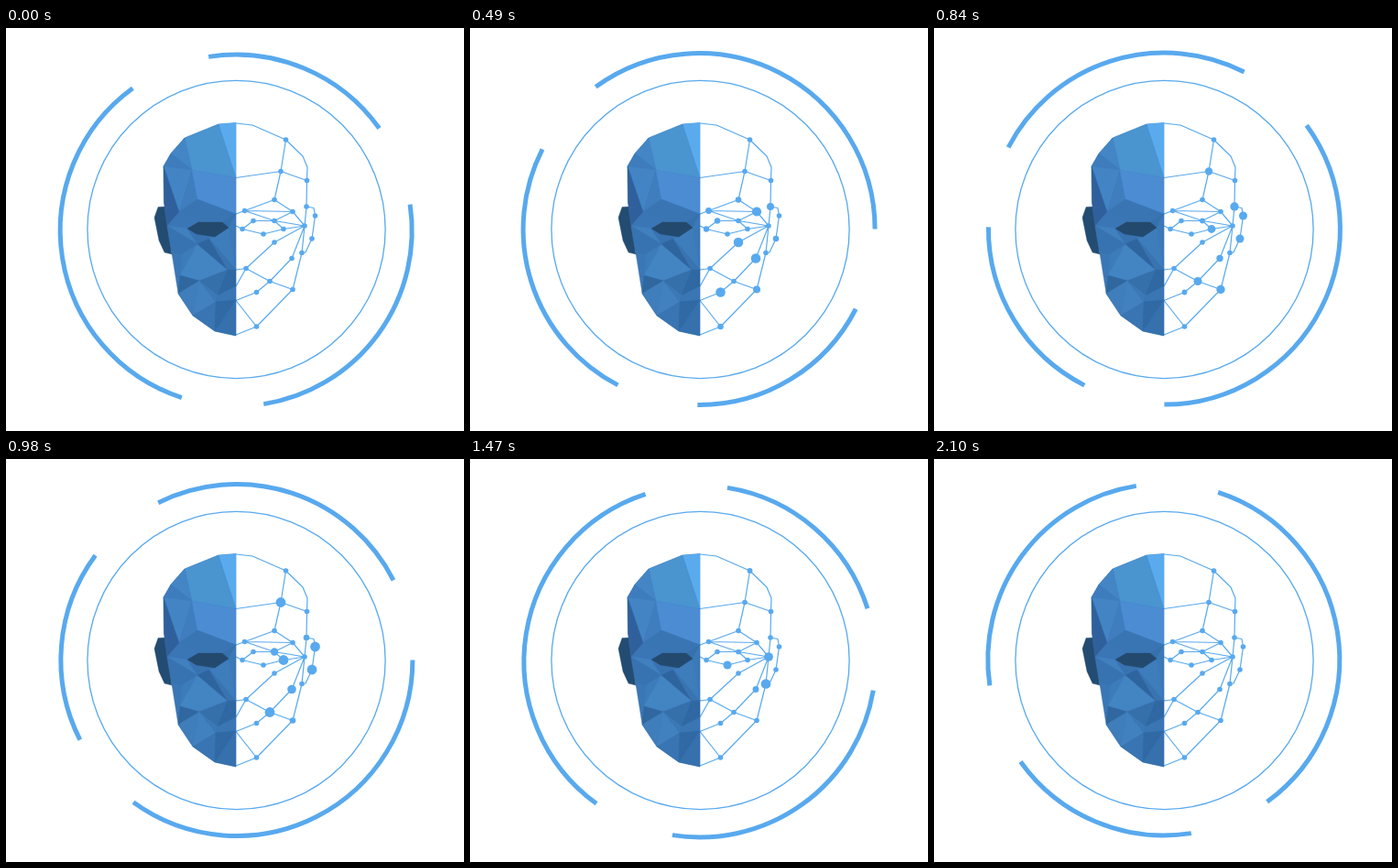
Recreate the animation shown at these times as an HTML page. Size 500 by 440 pixels, loop 2170 ms.

```html
<!DOCTYPE html>
<html lang="en">
<head>
<meta charset="utf-8">
<title>Face scan</title>
<style>
  html, body { margin: 0; width: 100%; height: 100%; overflow: hidden; background: #fff; }
  svg { display: block; width: 500px; height: 440px; }
  .line { fill: none; stroke: #58a9ee; }
</style>
</head>
<body>
<svg viewBox="0 0 500 440">
  <circle class="line" cx="251.5" cy="220" r="162.6" stroke-width="1.3"/>
  <g id="arcs">
    <circle class="line" cx="251.2" cy="221" r="192" stroke-width="5" pathLength="360"
      stroke-dasharray="63.5 27 89.5 27 126 27" transform="rotate(261 251.2 221)"/>
  </g>
  <path id="mesh" class="line" stroke-width="1.2" stroke-linejoin="round"/>
  <g id="face"></g>
  <g id="dots" fill="#58a9ee"></g>
</svg>
<script>
const STEP = 70, STEPS = 31, TURN = 18, REST = 2.8, SWELL = 2.6;
const $ = id => document.getElementById(id);

function add(parent, tag, attrs) {
  const el = document.createElementNS('http://www.w3.org/2000/svg', tag);
  for (const k in attrs) el.setAttribute(k, attrs[k]);
  parent.appendChild(el);
  return el;
}

// Corners of the shaded half
const corner = {
  A: [251, 103.5], B: [232, 105], C: [195, 120], D: [180, 137], E: [172, 151],
  F: [203, 155], G: [251, 163.5], H: [209, 187], I: [251, 203], J: [189, 201],
  K: [172.5, 190], L: [176, 216], M: [198, 219], N: [210, 212], O: [236, 212],
  P: [243, 218], Q: [228, 228], R: [208, 225], S: [181, 246], T: [209, 236],
  U: [222, 230], V: [190, 270], W: [251, 264], X: [188, 290], Y: [204, 314],
  Z: [228, 331], a: [251, 336], b: [211, 276], c: [231, 292], d: [251, 282],
  e: [251, 297], f: [242, 264], g: [229, 299], h: [192, 247],
  p: [175, 195], q: [166, 195.5], r: [162, 207], s: [167, 232], t: [173, 245], u: [181, 247]
};
const facets = {
  pqrstu: '#234c72', ABCDEKLSXYZa: '#3a77b5',
  ABG: '#5aabee', BCFG: '#4a94d0', CDF: '#4385c5', DEF: '#3e7cbd',
  EFJ: '#4384c4', FHJ: '#3f7dbe', EKLJ: '#30609c', FGIH: '#4b8cd2',
  HIONJ: '#3a75b3', JNML: '#3a76b5', IOP: '#3671ad', IPW: '#3b79b7',
  LMT: '#4180bf', LThS: '#3873b1', MRQUT: '#3873b0', PQUW: '#3d7dbc',
  ShV: '#3a77b6', hTV: '#3d7cba', TfbV: '#4384c3', TUf: '#2f659f',
  UfW: '#3974b1', VbX: '#30679f', XbY: '#3f7dbb', Ybg: '#4281bf',
  YgZ: '#3875b2', bfc: '#3670ab', bcg: '#3b78b5', fWdc: '#2f68a3',
  cdeg: '#3976b3', geZ: '#3069a4', eaZ: '#3671ad', MNOPQR: '#234a6e'
};
for (const keys in facets) {
  const points = [...keys].map(k => corner[k]).join(' ');
  const fill = facets[keys];
  add($('face'), 'polygon', { points, fill, stroke: fill, 'stroke-width': .4 });
}

// Each dot: x, y, then peak time and half width of its pulses
const dots = {
  a: [305.5, 122, 1770, 350], b: [300, 156.5, 1000, 330], c: [328.5, 166.5, 1790, 330],
  d: [293, 187.5, 290, 280], e: [260.5, 199.5, 300, 280], f: [313, 200.5, 550, 280],
  g: [328, 195, 700, 400], h: [337.5, 205, 970, 330], i: [293, 210.5, 1150, 350],
  j: [270, 210.5, 280, 280], k: [258, 219.5, 280, 280], l: [303, 219.5, 980, 330],
  m: [326, 216, 1590, 400], n: [281, 225, 1630, 400], o: [293, 234, 440, 370],
  p: [334, 230, 290, 280, 970, 320], q: [323, 245.5, 1440, 330],
  r: [312, 251.5, 550, 420, 1140, 500], s: [262, 262.5], t: [288, 276.5, 970, 330],
  u: [273.5, 288.5, 540, 340], v: [313, 285.5, 700, 400], w: [273.5, 326, 290, 280]
};
// Mesh joints without a dot
const joint = {
  A: [251, 104], B: [269, 106], C: [324, 140], D: [329, 152], E: [251, 163.5],
  F: [251, 203], G: [336, 196.5], H: [327, 245], I: [251, 216], J: [251, 264],
  K: [251, 282], L: [251, 297.5], M: [251, 335]
};
const chains = 'ABaCDcgmqvwM EbabcbdeFe dfm eif efm gGhpHq Ikjilnk lm im moJ mr sJ sK osts tv tr tuL Lw'
  .replace('moJ', 'mos').split(' ');
const place = k => (dots[k] || joint[k]).slice(0, 2);
$('mesh').setAttribute('d', chains.map(c => 'M' + [...c].map(place).join('L')).join(''));

const nodes = Object.values(dots).map(([cx, cy, ...pulses]) =>
  ({ el: add($('dots'), 'circle', { cx, cy, r: REST }), pulses }));

function swell(pulses, t) {
  let best = 0;
  for (let i = 0; i < pulses.length; i += 2) {
    const x = (t - pulses[i]) / pulses[i + 1];
    if (Math.abs(x) < 1) best = Math.max(best, Math.cos(x * Math.PI / 2) ** 2);
  }
  return best;
}

const start = performance.now();
function draw(now) {
  const n = Math.floor(Math.max(0, now - start) / STEP) % STEPS;
  $('arcs').setAttribute('transform', `rotate(${n * TURN} 251 220)`);
  for (const { el, pulses } of nodes)
    el.setAttribute('r', REST + SWELL * swell(pulses, n * STEP));
  requestAnimationFrame(draw);
}
draw(start);
</script>
</body>
</html>
```
